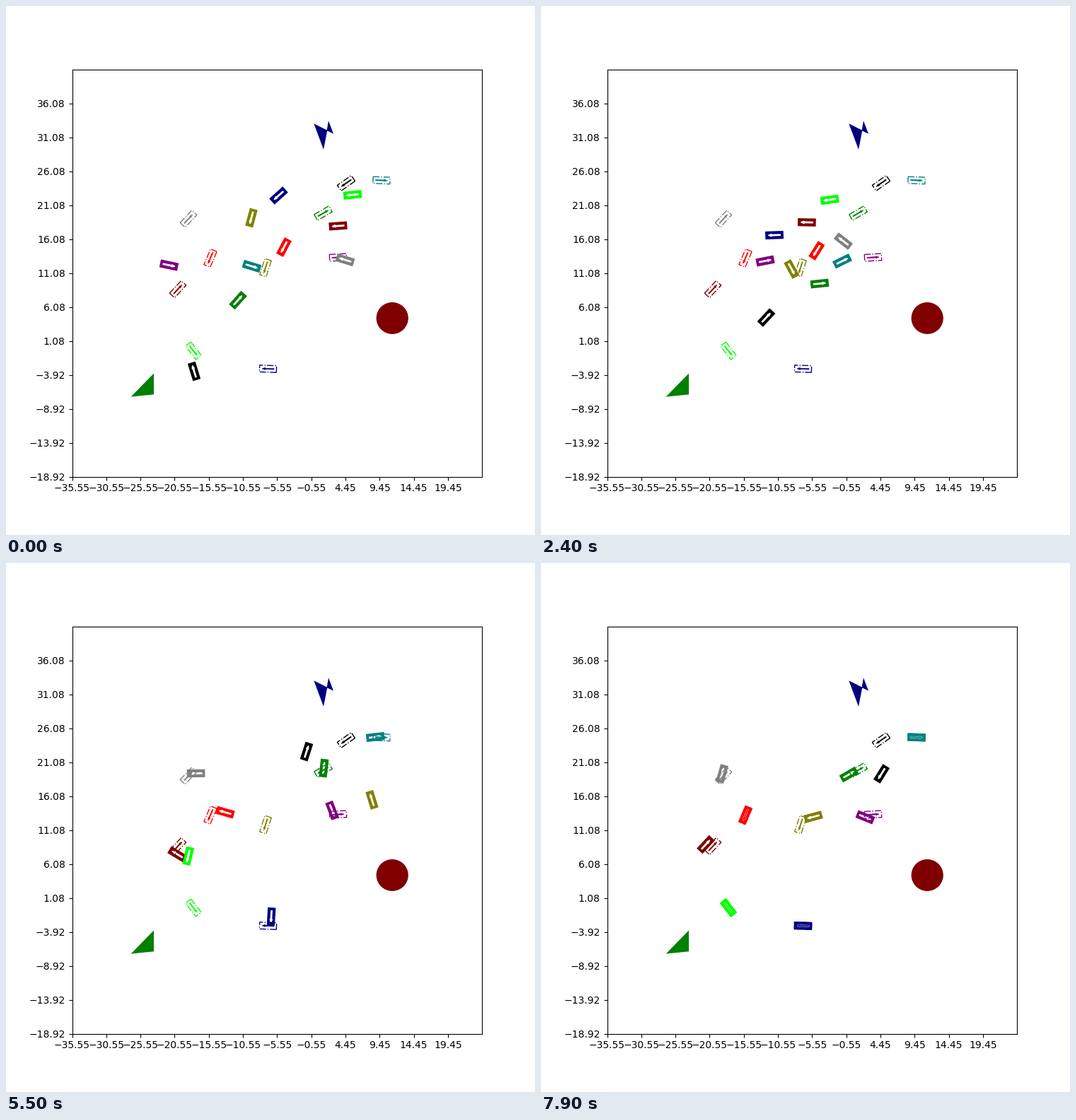
Recreate the animation shown at these times as a matplotlib script. Size 748 by 748 pixels, loop 8000 ms.

```python
import numpy as np
import matplotlib.pyplot as plt
from matplotlib.animation import FuncAnimation
from matplotlib.patches import Circle, Polygon

SIZE, DPI = 748, 100
X0, Y0, SPAN = -35.55, -18.92, 60
LEFT, BOTTOM, WIDTH, HEIGHT = 0.125, 0.11, 0.775, 0.77
FRAMES, INTERVAL = 80, 100
LAST = FRAMES - 2            # the first picture is held for two frames
RAMP, POWER = 34, 1.65       # cars speed up until step RAMP

fig = plt.figure(figsize=(SIZE / DPI, SIZE / DPI), dpi=DPI, facecolor="white")
ax = fig.add_axes([LEFT, BOTTOM, WIDTH, HEIGHT])
ax.set_xlim(X0, X0 + SPAN)
ax.set_ylim(Y0, Y0 + SPAN)
for axis, low in ((ax.xaxis, X0), (ax.yaxis, Y0)):
    axis.set_ticks(low + 5 * np.arange(12))
    axis.set_major_formatter(lambda v, _: f"{v:.2f}".replace("-", "\u2212"))

# Stage points are complex numbers in pixels: x - i*y, with y measured down.


def to_data(z):
    return np.column_stack((
        X0 + SPAN * (np.real(z) / SIZE - LEFT) / WIDTH,
        Y0 + SPAN * (1 + np.imag(z) / SIZE - BOTTOM) / HEIGHT))


def outline(*points):
    return np.array([complex(x, -y) for x, y in points])


def unit(degrees):
    return np.exp(1j * np.radians(degrees))


# car shapes around their centre, nose along +x
BODY = outline((-12, -4.8), (12, -4.8), (12, 4.8), (-12, 4.8))
ARROW = outline((-8.5, -0.7), (4, -0.7), (4, -1.6), (8.5, 0),
                (4, 1.6), (4, 0.7), (-8.5, 0.7))


def clock(step):
    """Speeding-up time that runs on evenly after RAMP."""
    s = np.asarray(step, float)
    return np.where(s < RAMP, RAMP * (s / RAMP) ** POWER,
                    RAMP + POWER * (s - RAMP))


def leg(start, end, u):
    """Arc-like curve between two poses, driven forwards or in reverse."""
    (x0, y0, a0), (x1, y1, a1) = start, end
    z0, z1 = complex(x0, -y0), complex(x1, -y1)
    d0, d1 = unit(a0), unit(a1)
    chord = z1 - z0
    turn = np.angle(d1 / d0)
    gear = 1 if (chord * np.conj(d0 + d1)).real > 0 else -1
    pull = gear * abs(chord) / np.cos(turn / 4) ** 2
    m0, m1 = pull * d0, pull * d1
    z = (z0 + chord * u * u * (3 - 2 * u)
         + m0 * u * (1 - u) ** 2 - m1 * u * u * (1 - u))
    dz = (chord * 6 * u * (1 - u)
          + m0 * (1 - u) * (1 - 3 * u) + m1 * u * (3 * u - 2))
    return z, gear * dz / np.abs(dz)


def drive(poses):
    """Centre and nose direction at every step."""
    centre = np.zeros(LAST + 1, complex)
    nose = centre.copy()
    keys = sorted(poses)
    for a, b in zip(keys, keys[1:]):
        n = np.arange(a, b + 1)
        u = (clock(n) - clock(a)) / (clock(b) - clock(a))
        centre[n], nose[n] = leg(poses[a], poses[b], u)
    return centre, nose


cars = []


def add_car(color, goal, poses):
    """Poses are {step: (x, y, heading)}; by default the car ends at its goal."""
    z = 2 + 0.01 * len(cars)
    gx, gy, heading = goal
    parked = [to_data(complex(gx, -gy) + s * unit(heading))
              for s in (BODY, ARROW)]
    body = Polygon(parked[0], color=color, lw=1.2, zorder=z)
    arrow = Polygon(parked[1], color="white", lw=1, zorder=z + 0.002)
    box = Polygon(parked[0], fill=False, ec=color, lw=1, ls="-.",
                  zorder=z + 0.004)
    mark = Polygon(parked[1], color=color, lw=0.4, zorder=z + 0.006)
    for patch in (body, arrow, box, mark):
        ax.add_patch(patch)
    cars.append((*drive({LAST: goal} | poses), body, arrow))


# obstacles
ax.add_patch(Circle(to_data(546.2 - 441.4j)[0], 2.34, color="maroon", lw=0))
ax.add_patch(Polygon(to_data(outline((209, 519.5), (209, 549.3), (176.7, 552.5))),
                     color="green", lw=0))
ax.add_patch(Polygon(to_data(outline((435.3, 166.3), (453.7, 175.5), (456, 162.3),
                                     (463, 180.7), (454.2, 176.5), (449, 203))),
                     color="navy", lw=0))

add_car("purple", (469.5, 355.5, 3),
        {0: (230.5, 366.5, -12), 23: (317, 360.5, 11), 34: (368, 323.5, 9),
         45: (444, 331, -4), 64: (478, 377.5, -27), LAST: (458.5, 359.5, -22)})
add_car("olive", (367, 370, 252),
        {0: (347, 299.5, 255), 34: (405, 405.5, -4), 45: (499.5, 415.5, 47),
         64: (463, 320, 226), LAST: (385, 359, 195)})
add_car("teal", (531, 246.5, -2),
        {0: (347.5, 368, -17), 34: (481, 311, 57), 45: (514.5, 248.5, 31),
         64: (531.5, 246, -3)})
add_car("navy", (370.5, 513, 178),
        {0: (385.5, 268, 222), 23: (330, 324, 182), 34: (312, 386, -65),
         45: (363, 479, -27), 64: (358, 514, 170)})
add_car("maroon", (243, 400.5, 47),
        {0: (469.5, 311, 184), 34: (305, 330, 228), 45: (267, 408, 228),
         64: (237, 387, 53), LAST: (233, 398, 47)})
add_car("green", (448.5, 293, 30),
        {0: (328, 416, 48), 23: (394, 392.5, 6), 34: (431, 343, 76),
         45: (449, 292, 70), 64: (450, 288, 51), LAST: (435.5, 299, 30)})
add_car("black", (481, 250.5, 215),
        {0: (266, 516.5, 107), 23: (318.5, 440.5, 47), 34: (368, 400, 9),
         45: (419, 357, 98), 64: (476, 244, -40), LAST: (481.5, 298, 238)})
add_car("red", (289, 356.5, 247),
        {0: (393, 341, 242), 15: (395, 336.5, 243), 34: (376.5, 359, 206),
         45: (336, 361, 168), 64: (288, 358, 243)})
add_car("lime", (265, 487.5, 308),
        {0: (490, 267, 186), 34: (340, 297, 213), 45: (285, 361, 229),
         64: (262, 480, 291)})
add_car("gray", (258, 301, 47),
        {0: (479.5, 359, 163), 34: (394, 292.5, 117), 45: (317.5, 290.5, 193),
         64: (257, 282.5, 42), LAST: (256, 298, 74)})


def update(frame):
    step = max(0, frame - 1)
    for centre, nose, body, arrow in cars:
        for patch, shape in ((body, BODY), (arrow, ARROW)):
            patch.set_xy(to_data(centre[step] + shape * nose[step]))
    return [patch for car in cars for patch in car[2:]]


anim = FuncAnimation(fig, update, frames=FRAMES, interval=INTERVAL,
                     repeat=True, repeat_delay=0, blit=False)
plt.show()
```
